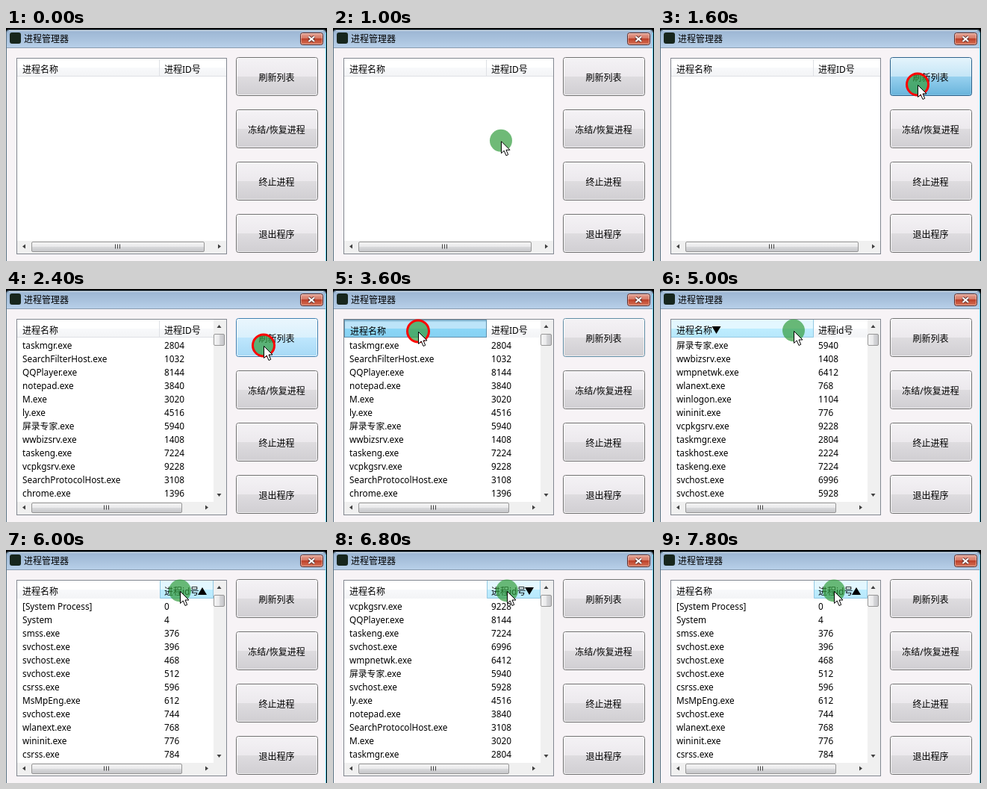
Write an HTML page that moves like this. It is 430 px wide and 312 px high and loops after 8000 ms.

```html
<!DOCTYPE html>
<html lang="zh">
<head>
<meta charset="utf-8">
<style>
html, body { margin: 0; width: 100%; height: 100%; overflow: hidden; background: #000; }
svg { display: block; width: 430px; height: 312px; }
text { font: 12px "Noto Sans", "Noto Sans CJK SC", "Noto Sans CJK", sans-serif; fill: #000; }
.row { font-size: 11.8px; }
</style>
</head>
<body>
<svg id="stage" viewBox="0 0 430 312" xmlns="http://www.w3.org/2000/svg">
  <defs id="defs"></defs>
  <rect width="430" height="312" fill="#000"/>
  <path d="M0 312V6Q0 2 4 2H425Q429 2 429 6V312Z" fill="#5c7384"/>
  <path d="M1 27V7Q1 3 5 3H424Q428 3 428 7V27Z" fill="url(#title)"/>
  <path d="M4 3.5H425" stroke="#fff" stroke-opacity=".6"/>
  <rect x="1" y="26" width="427" height="286" fill="#f7f3f6"/>
  <path d="M1 26.5H428" stroke="#8a9db0"/>
  <path d="M428.5 6V312" stroke="#58cdf0"/>
  <rect x="5" y="6" width="15" height="15" rx="3" fill="#17261d"/>
  <text x="24" y="19">进程管理器</text>
  <rect x="394.5" y="6.5" width="30" height="16" rx="3" fill="url(#close)" stroke="#5a2a28"/>
  <rect x="395.5" y="7.5" width="28" height="14" rx="2" fill="none" stroke="#fff" stroke-opacity=".4"/>
  <path d="M405.5 11.5L413 18M413 11.5L405.5 18" stroke="#5b3433" stroke-width="4"/>
  <path d="M405.5 11.5L413 18M413 11.5L405.5 18" stroke="#fff" stroke-width="2.2"/>
  <g id="view"></g>
</svg>
<script>
const STEP = 200, LOOP = 8000;
const view = document.getElementById('view');

// Two-tone glossy gradient: colours of the upper and the lower half.
const gloss = (id, a, b, c, d, across) =>
  `<linearGradient id="${id}" x2="${across ? 1 : 0}" y2="${across ? 0 : 1}">
    <stop stop-color="${a}"/><stop offset=".5" stop-color="${b}"/>
    <stop offset=".5" stop-color="${c}"/><stop offset="1" stop-color="${d}"/></linearGradient>`;

document.getElementById('defs').innerHTML =
  gloss('title', '#9cb6d3', '#a9c2dd', '#a9c2dd', '#b9d1ea') +
  gloss('close', '#e6a596', '#d3735f', '#bd4029', '#d8765a') +
  gloss('btn', '#f4f2f5', '#ece9ed', '#dedcdf', '#d0ced2') +
  gloss('hot', '#eaf6fd', '#d9f0fc', '#bee6fd', '#a7d9f5') +
  gloss('down', '#e5f4fc', '#c4e5f6', '#98d1ef', '#68b3db') +
  gloss('head', '#ffffff', '#ffffff', '#f8f9fb', '#f3f4f6') +
  gloss('headHot', '#e3f7ff', '#e3f7ff', '#bdedff', '#b7e7fb') +
  gloss('headDown', '#bce4f9', '#bce4f9', '#8ad6f7', '#86d0f2') +
  gloss('thumbH', '#f5f5f5', '#e9e9eb', '#d9dadc', '#c4c4c8') +
  gloss('thumbV', '#f5f5f5', '#e9e9eb', '#d9dadc', '#c4c4c8', true);

// Newest process first, as the list loads it.
const procs = `taskmgr.exe|2804,SearchFilterHost.exe|1032,QQPlayer.exe|8144,notepad.exe|3840,
M.exe|3020,ly.exe|4516,屏录专家.exe|5940,wwbizsrv.exe|1408,taskeng.exe|7224,vcpkgsrv.exe|9228,
SearchProtocolHost.exe|3108,chrome.exe|1396,wmpnetwk.exe|6412,svchost.exe|6996,svchost.exe|5928,
explorer.exe|2468,dwm.exe|2416,taskhost.exe|2224,svchost.exe|512,svchost.exe|468,svchost.exe|396,
wlanext.exe|768,MsMpEng.exe|612,svchost.exe|744,winlogon.exe|1104,csrss.exe|784,wininit.exe|776,
csrss.exe|596,smss.exe|376,System|4,[System Process]|0`
  .split(',').map(s => s.trim().split('|')).map(([name, pid]) => ({ name, pid: +pid }));

const byPid = (a, b) => a.pid - b.pid;
const byName = (a, b) => a.name < b.name ? -1 : a.name > b.name ? 1 : byPid(a, b);

// First step, sorted column, direction.
const sorts = [[19, 0, 1], [23, 0, -1], [30, 1, 1], [34, 1, -1], [39, 1, 1]];
const sortAt = k => sorts.filter(s => s[0] <= k).pop();

function rowsAt(k, sort) {
  if (k < 9) return [];
  if (k < 11) return procs.slice(k === 9 ? -7 : -18);
  if (!sort) return procs;
  const cmp = sort[1] ? byPid : byName;
  return [...procs].sort((a, b) => sort[2] * cmp(a, b));
}

// Pointer stops: step, x, y.
const stops = [[2, 4, 290], [7, 345, 76], [13, 345, 76], [17, 114, 57],
  [24, 114, 57], [25, 179, 56], [27, 233, 55], [40, 233, 55]];

function pointerAt(k) {
  if (k < 2) return null;
  const i = stops.findIndex(s => s[0] > k);
  const [k0, x0, y0] = stops[i - 1], [k1, x1, y1] = stops[i];
  const u = (k - k0) / (k1 - k0), e = u * u * (3 - 2 * u);
  return { x: x0 + (x1 - x0) * e, y: y0 + (y1 - y0) * e };
}

const clicking = k => (k >= 8 && k <= 12) || [18, 22, 29, 33, 38].includes(k);

const rect = (x, y, w, h, fill, more = '') =>
  `<rect x="${x}" y="${y}" width="${w}" height="${h}" fill="${fill}" ${more}/>`;
const label = (x, y, s, more = '') => `<text x="${x}" y="${y}" ${more}>${s}</text>`;
const shape = (d, more = '') => `<path d="${d}" ${more}/>`;

function button(i, name, state, focused) {
  const y = 39 + 70 * i;
  const edge = focused ? '#5f8ba3' : { btn: '#707070', hot: '#3c7fb1', down: '#2c628b' }[state];
  return rect(308.5, y + .5, 109, 51, `url(#${state})`, `rx="3" stroke="${edge}"`) +
    rect(309.5, y + 1.5, 107, 49, 'none', `rx="2" stroke="#fff" stroke-opacity="${state === 'down' ? .15 : .7}"`) +
    label(362.5, y + 32, name, 'text-anchor="middle"');
}

function header(col, state, sort, right) {
  const x = col ? 206 : 15, w = (col ? right : 206) - x;
  const push = state === 'headDown' ? 1 : 0;
  let s = rect(x, 41, w, 24, `url(#${state})`);
  if (state === 'headHot') s += shape(`${col ? 'M206.5 41V64.5' : 'M15 64.5'}H${x + w - .5}V41`, 'fill="none" stroke="#93c9e3"');
  if (push) s += rect(x, 42, w, 2, '#7fb4d0', 'fill-opacity=".5"') +
    rect(x + .5, 41.5, w - 1, 23, 'none', 'stroke="#5f90ad"');
  s += label((col ? 212 : 22) + push, 60 + push, col ? `进程${sort ? 'id' : 'ID'}号` : '进程名称');
  if (sort && sort[1] === col) {
    const a = col ? 257 : 69.5;
    s += shape(sort[2] > 0 ? `M${a} 60h12l-6 -10z` : `M${a} 50h12l-6 10z`);
  }
  return s;
}

function scrollbars(full) {
  const right = full ? 278 : 295, tw = full ? 202 : 232, mid = 34 + tw / 2;
  let s = rect(15, 285, 280, 17, '#f0f0f0') +
    rect(34.5, 286.5, tw - 1, 13, 'url(#thumbH)', 'rx="1.5" stroke="#979797"') +
    shape(`M${mid - 3.5} 289.5v6m3 -6v6m3 -6v6`, 'stroke="#444"') +
    shape(`M26 289.5v6l-4 -3zM${right - 11} 289.5v6l4 -3z`, 'fill="#404040"');
  if (full) s += rect(278, 41, 17, 244, '#f0f0f0') +
    rect(278.5, 60.5, 14, 15, 'url(#thumbV)', 'rx="1.5" stroke="#979797"') +
    shape('M282.5 52h6l-3 -4zM282.5 274h6l-3 4z', 'fill="#404040"');
  return s;
}

function pointer({ x, y }, click) {
  return `<g transform="translate(${x} ${y})">
    <circle cy="-.5" r="15" fill="#329c3d" fill-opacity=".7"/>
    ${click ? '<circle cy="-.5" r="14.5" fill="none" stroke="#f00" stroke-width="3"/>' : ''}
    <path d="M.5 .5V16.5L4.2 13 7 19.5 9.7 18.3 7 12H12Z" fill="#fff" stroke="#000"/></g>`;
}

function draw(ms) {
  const k = Math.floor(ms % LOOP / STEP);
  const p = pointerAt(k), click = clicking(k), sort = sortAt(k);
  const rows = rowsAt(k, sort), full = rows.length > 11, right = full ? 278 : 295;
  const inHead = p && p.y > 41 && p.y < 65;
  const over = col => inHead && (col ? p.x >= 206 && p.x < right : p.x > 15 && p.x < 206);
  const headState = col => !over(col) ? 'head' : click ? 'headDown' : 'headHot';
  const onRefresh = p && p.x >= 308 && p.y > 39 && p.y < 91;
  const focused = full && !sort && !onRefresh;

  view.innerHTML =
    rect(14.5, 40.5, 281, 262, '#fff', 'stroke="#828790"') +
    header(0, headState(0), sort, right) + header(1, headState(1), sort, right) +
    (inHead ? '' : shape(`M15 64.5H${right}M205.5 42V64`, 'stroke="#dfe1e5"')) +
    rows.slice(0, 12).map((r, i) =>
      label(22, 80 + 18 * i, r.name, 'class="row"') +
      label(212, 80 + 18 * i, r.pid, 'class="row"')).join('') +
    scrollbars(full) +
    ['刷新列表', '冻结/恢复进程', '终止进程', '退出程序'].map((name, i) =>
      button(i, name, i || !onRefresh ? 'btn' : k === 8 ? 'down' : 'hot', !i && focused)).join('') +
    (p ? pointer(p, click) : '');
}

let last = -1;
const start = performance.now();
function tick() {
  const ms = performance.now() - start, k = Math.floor(ms / STEP);
  if (k !== last) draw(ms);
  last = k;
  requestAnimationFrame(tick);
}
tick();
</script>
</body>
</html>
```
